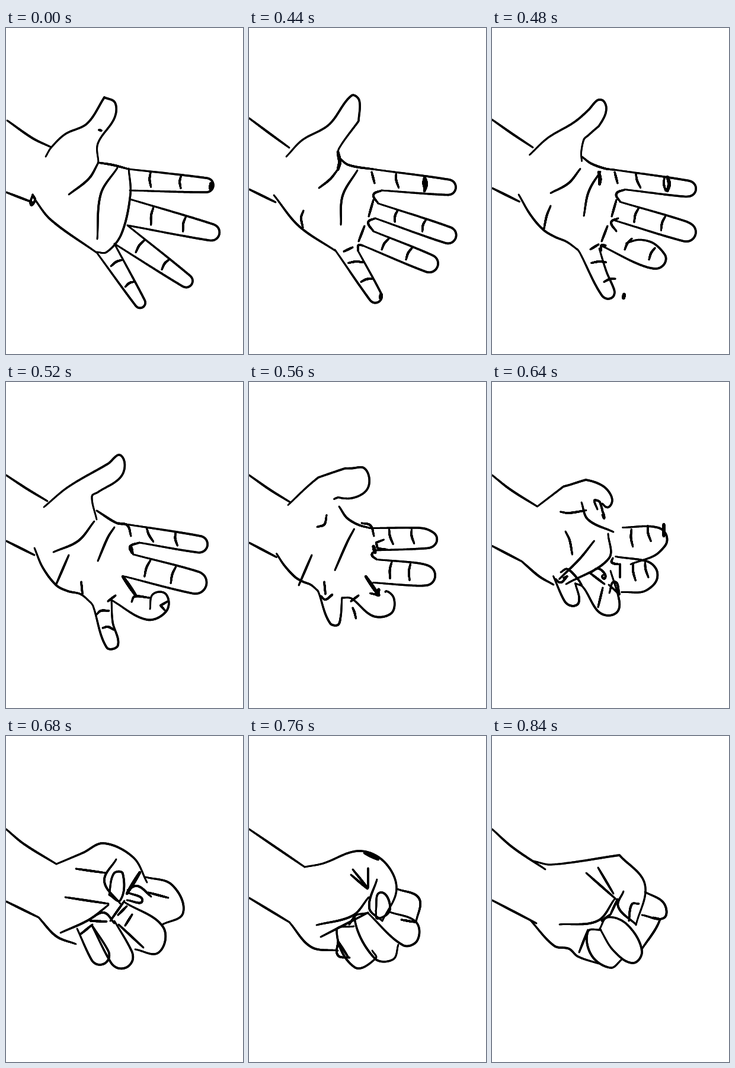
An HTML page with a canvas for the animation above (1280 ms loop, 400x550 px).

```html
<!DOCTYPE html>
<html lang="en">
<head>
<meta charset="utf-8">
<title>Hand closing into a fist</title>
<style>
html, body { margin: 0; width: 100%; height: 100%; overflow: hidden; background: #fff; }
canvas { display: block; width: 400px; height: 550px; }
</style>
</head>
<body>
<canvas id="stage" width="400" height="550"></canvas>
<script>
const HOLD = 440, STEP = 40, LOOP = 1280;
const PEN = 3.5, BOLD = 5.5, CUTS = 120;
const ctx = document.getElementById('stage').getContext('2d');
ctx.lineCap = ctx.lineJoin = 'round';

const gap = (a, b) => Math.hypot(b[0] - a[0], b[1] - a[1]);
const mix = (a, b, k) => a.map((v, i) => v + (b[i] - v) * k);
const move = (p, u, k) => [p[0] + u[0] * k, p[1] + u[1] * k];
const unit = (a, b) => {
  const d = gap(a, b) || 1;
  return [(b[0] - a[0]) / d, (b[1] - a[1]) / d];
};

// Smooth curve through a few points, cut into equal lengths. A doubled point is a corner.
function curve(pts) {
  const line = [pts[0]], dist = [0];
  for (let i = 0; i + 1 < pts.length; i++) {
    const a = pts[i], b = pts[i + 1], d = gap(a, b);
    if (!d) continue;
    const p = move(a, unit(pts[i - 1] || a, b), d / 3);
    const q = move(b, unit(a, pts[i + 2] || b), -d / 3);
    for (let n = 1; n <= 16; n++) {
      const t = n / 16, m = mix(p, q, t);
      line.push(mix(mix(mix(a, p, t), m, t), mix(m, mix(q, b, t), t), t));
      dist.push(dist.at(-1) + gap(line.at(-2), line.at(-1)));
    }
  }
  const out = [];
  for (let n = 0, i = 1; n <= CUTS; n++) {
    const d = dist.at(-1) * n / CUTS;
    while (i < line.length - 1 && dist[i] < d) i++;
    out.push(mix(line[i - 1], line[i], (d - dist[i - 1]) / (dist[i] - dist[i - 1])));
  }
  return out;
}

const points = text => text.split(' ').map(s => s.split(',').map(Number));
const stroke = (pts, pen = PEN) => ({ pen, pts: curve(pts) });

// A finger: two straight sides from its base, a round tip and creases across.
function finger(lines, name, text, r, folds) {
  const [a, tip, b] = points(text);
  const u = unit(mix(a, b, 0.5), tip), n = [u[1], -u[0]];
  const c = move(tip, u, -r), p = move(c, n, r), q = move(c, n, -r);
  const arc = [45, 0, -45].map(deg => {
    const s = deg * Math.PI / 180;
    return move(move(c, u, r * Math.cos(s)), n, r * Math.sin(s));
  });
  lines[name] = stroke([a, p, ...arc, q, b]);
  folds.forEach((k, i) => {
    const x = mix(a, p, k), y = mix(b, q, k);
    lines[name + i] = stroke([mix(x, y, 0.05), move(mix(x, y, 0.4), u, -2), mix(x, y, 0.8)]);
  });
  return { a, b, u };
}

function build({ fingers = {}, folds = [], webbed, ...drawn }) {
  const lines = {};
  let last;
  for (const [name, [text, r]] of Object.entries(fingers)) {
    const f = finger(lines, name, text, r, folds);
    if (webbed && last) {
      const mid = move(mix(last.b, f.a, 0.5), f.u, -gap(last.b, f.a) / 2);
      lines[name + 'Web'] = stroke([last.b, mid, f.a]);
    }
    last = f;
  }
  for (const [name, text] of Object.entries(drawn)) {
    lines[name] = stroke(points(text.replace('!', '')), text[0] === '!' ? BOLD : PEN);
  }
  return lines;
}

const open = {
  fingers: {
    index: ['207,238 350,266 209,274', 12],
    middle: ['210,289 360,348 205,333', 14],
    ring: ['205,333 313,433 183,364', 11],
    pinky: ['183,364 231,471 154,380', 9]
  },
  folds: [0.28, 0.67],
  arm: '2,156 45,186 76,201',
  thumb: '67,217 76,202 100,179 137,161 166,117 166,117 184,126 183,152 155,195 156,227',
  thumbDot: '157,172 161,173',
  life: '156,227 140,254 106,281',
  web: '155,227 180,231 207,238',
  tipShade: '!346,262 345,272',
  edge: '207,237 210,280 195,347 170,378 152,378',
  palm: '188,236 160,280 154,356',
  sleeve: '0,277 47,295',
  wrist: '45,281 42,298 49,290 45,281',
  heel: '45,284 75,323 153,379'
};

const spread = {
  fingers: {
    index: ['215,239 349,270 224,274', 13],
    middle: ['218,296 349,354 213,321', 14],
    ring: ['210,343 318,403 192,367', 15],
    pinky: ['184,376 219,462 145,374', 11]
  },
  folds: [0.27, 0.66],
  webbed: true,
  arm: '0,152 35,178 68,202',
  thumb: '63,217 90,189 135,163 173,114 186,122 185,157 185,157 152,203 150,217',
  web: '150,217 168,231 215,239',
  joint: '!150,209 153,226 150,239',
  life: '149,240 137,255 118,270',
  indexShade: '!296,251 299,263 296,275',
  pinkyShade: '!223,449 222,456',
  i0: '207,243 212,262',
  edge: '210,290 202,318',
  edge2: '195,334 185,360',
  p0: '160,377 175,370',
  palm: '183,240 158,283 155,332',
  sleeve: '0,272 45,294',
  heel: '42,282 84,334 146,376',
  wrist: '92,308 88,320 91,337'
};

const cup = {
  fingers: {
    index: ['203,240 340,276 225,271', 14],
    middle: ['215,291 338,343 200,328', 19]
  },
  folds: [0.27, 0.66],
  webbed: true,
  arm: '0,157 35,180 70,201',
  thumb: '64,211 105,177 172,138 194,124 196,157 155,186 145,193 153,232',
  web: '153,217 187,238 203,240',
  life: '149,235 122,268 80,287',
  sleeve: '0,268 48,292',
  heel: '48,280 62,313 85,343 105,353 126,358 144,373',
  wrist: '106,292 84,343',
  nub: '127,337 129,358',
  palm: '183,245 172,262 155,302',
  knuckle: '190,238 205,242 211,260',
  joint: '!210,277 213,288',
  blade: '!197,328 219,360',
  ring: '243,383 248,358 270,358 271,386 238,401 178,368',
  r1: '212,371 217,362 242,364',
  nail: '273,370 261,377 261,377 268,385',
  p0: '172,370 185,360',
  pinky: '178,368 180,405 189,444 170,448 147,378 143,372',
  p1: '153,392 160,386 174,386',
  p2: '163,415 172,413 182,418'
};

const curl = {
  fingers: {
    index: ['205,253 296,250 204,297', 17],
    middle: ['216,308 290,312 219,349', 19]
  },
  folds: [0.43, 0.82],
  webbed: true,
  arm: '0,157 35,183 68,204',
  thumb: '68,204 115,154 115,154 163,147 163,147 200,172 203,205 170,212 134,163',
  nail: '182,162 163,168 163,168 174,184 174,184 198,180',
  life: '113,214 125,216 150,202',
  web: '151,203 162,232 205,253',
  tipShade: '!290,240 290,260',
  edge: '216,307 216,330',
  palm: '172,251 135,333',
  crease: '148,232 138,258 98,299',
  sweep: '196,256 197,298 125,341',
  ringTip: '192,335 208,325 218,352 208,362 192,345 192,335',
  r1: '197,342 215,358 215,358 207,337 198,356',
  r0: '165,322 190,341',
  ring: '217,325 218,375 208,395 178,388 152,352 136,360',
  pinky: '136,360 127,380 103,365 87,330',
  pinkyTip: '90,330 105,319 126,350 133,372',
  p1: '90,330 100,347 115,332 115,332 95,343',
  p2: '187,347 179,380',
  sleeve: '0,274 45,299',
  heel: '45,299 68,313 90,333'
};

const fold = {
  fingers: {
    ring: ['183,312 204,390 145,320', 20],
    pinky: ['145,319 166,384 120,325', 16]
  },
  arm: '0,157 30,182 85,216',
  thumb: '85,216 130,197 165,181 215,205 238,247',
  ball: '186,208 166,245 193,283',
  nail: '174,268 182,232 197,232 193,277 174,268',
  blade: '!226,230 204,266',
  life: '118,224 168,231',
  crease: '100,272 173,283',
  index: '236,238 280,251 299,298 264,318',
  i1: '205,260 222,253 245,271',
  i2: '240,264 274,273',
  indexTip: '206,264 230,278 204,277',
  middle: '201,281 265,322 258,365 218,360',
  m1: '213,301 201,320',
  m2: '189,302 204,287',
  m3: '190,318 232,357',
  p1: '125,335 146,318',
  ringTip: '140,310 165,298 183,316',
  pinkyTip: '142,312 170,313',
  joint: '176,312 200,278',
  palm: '173,285 140,310 92,332',
  sleeve: '0,279 55,306',
  heel: '55,306 85,338 118,351'
};

const grip = {
  arm: '0,157 94,221',
  thumb: '94,221 125,215 185,194 228,212 249,258 225,312',
  ball: '216,242 203,290 225,312',
  nail: '214,295 222,264 238,292 217,308 214,295',
  ridge: '!195,197 218,208',
  life: '172,234 200,258',
  n1: '175,225 201,257',
  n2: '201,223 201,256',
  palm: '202,272 175,303 114,319',
  crease: '201,298 121,339',
  sleeve: '0,273 68,314',
  heel: '68,314 105,356 150,362',
  index: '250,258 287,274 282,314',
  middle: '238,297 282,314 284,345 260,353 200,298',
  m1: '257,310 280,314',
  ring: '201,298 178,307 212,375 243,377 252,352',
  pinky: '177,321 148,328 178,390 214,375 208,362',
  p1: '150,347 150,370 170,374',
  p2: '151,347 168,374',
  r1: '169,318 180,302'
};

const fist = {
  arm: '0,157 35,188 90,225',
  thumb: '70,211 100,217 215,201 215,201 258,250 243,319',
  ball: '222,262 213,288 243,318',
  nail: '231,312 236,284 248,283',
  life: '159,231 209,275',
  n1: '179,222 205,266',
  palm: '207,275 178,312 114,318',
  blade: '212,275 200,301',
  sleeve: '0,277 75,316',
  heel: '64,310 105,354 130,359 145,372 180,384',
  crease: '162,327 147,365',
  index: '258,263 290,282 290,307 253,302',
  middle: '272,306 283,311 252,361',
  ring: '182,325 195,306 228,318 253,362 238,383 205,362 182,325',
  pinky: '184,327 162,330 168,370 200,391 219,377',
  r1: '185,312 200,301'
};

// Halfway drawing: shared strokes meet in the middle.
function between(a, b) {
  const lines = {};
  for (const name in a) {
    const from = a[name], to = b[name] || from;
    lines[name] = { pen: from.pen, pts: from.pts.map((p, i) => mix(p, to.pts[i], 0.5)) };
  }
  return lines;
}

const [rest, ...keys] = [open, spread, cup, curl, fold, grip, fist].map(build);
const frames = [rest, ...keys.flatMap((k, i) => keys[i + 1] ? [k, between(k, keys[i + 1])] : [k])];

// Brush strokes swell a little towards the middle.
function draw(lines) {
  ctx.fillStyle = '#fff';
  ctx.fillRect(0, 0, 400, 550);
  for (const { pen, pts } of Object.values(lines)) {
    for (let i = 1; i < pts.length; i++) {
      ctx.lineWidth = pen * (0.8 + 0.25 * Math.sin(Math.PI * i / CUTS));
      ctx.beginPath();
      ctx.moveTo(...pts[i - 1]);
      ctx.lineTo(...pts[i]);
      ctx.stroke();
    }
  }
}

let shown = -1;
function tick() {
  const t = performance.now() % LOOP;
  const now = t < HOLD ? 0 : Math.min(frames.length - 1, 1 + Math.floor((t - HOLD) / STEP));
  if (now !== shown) draw(frames[shown = now]);
  requestAnimationFrame(tick);
}
tick();
</script>
</body>
</html>
```
